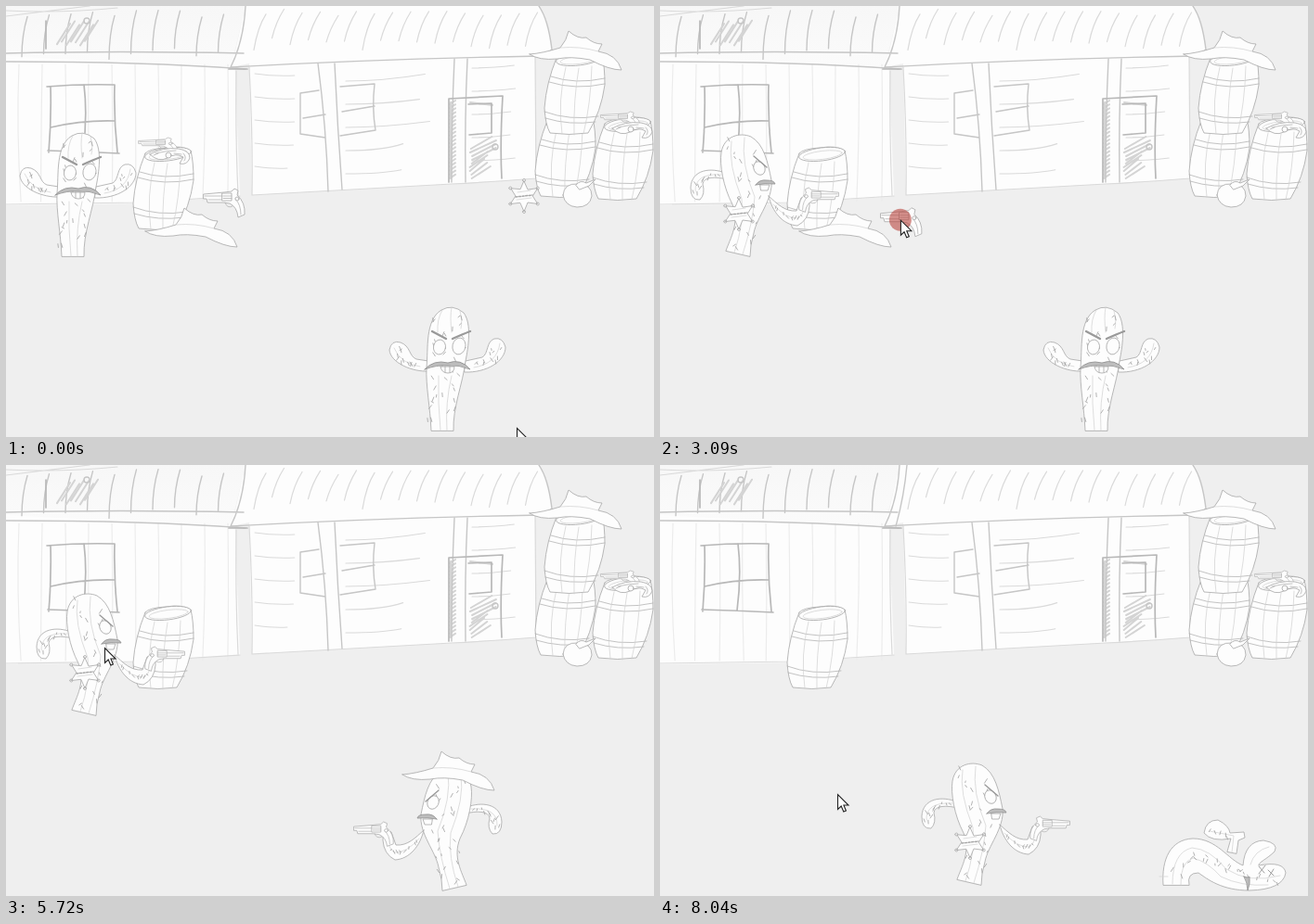
Recreate the animation shown at these times as an HTML page. Size 698x465 px, loop 8420 ms.

```html
<!DOCTYPE html>
<html lang="en">
<head>
<meta charset="utf-8">
<title>Cactus duel</title>
<style>
html, body { margin: 0; width: 100%; height: 100%; overflow: hidden; background: #efefef; }
svg { display: block; width: 698px; height: 465px; }
.item { fill: #fdfdfd; stroke: #a8a8a8; stroke-width: .8; stroke-linejoin: round; stroke-linecap: round; }
.item .thin { fill: none; stroke: #d0d0d0; stroke-width: .7; }
.item .hoop { fill: none; stroke: #b4b4b4; stroke-width: .8; }
.item .spines { fill: none; stroke: #a0a0a0; stroke-width: .8; }
.item .dark { fill: #bdbdbd; stroke: #909090; }
.item .brow { fill: none; stroke: #9a9a9a; stroke-width: 2.4; }
.item .slim { stroke-width: 1.4; }
.pencil { fill: none; stroke: #c6c6c6; stroke-width: 1.4; stroke-linecap: round; stroke-linejoin: round; }
.pencil .faint { stroke: #ececec; stroke-width: 1.2; }
.pencil .soft { stroke: #dadada; stroke-width: 1.2; }
.pencil .bold { stroke: #b8b8b8; stroke-width: 1.7; }
.pencil .shade { stroke: #d4d4d4; stroke-width: 2; }
</style>
</head>
<body>
<svg viewBox="0 0 698 465">
  <defs>
    <linearGradient id="roofShade" x2="0" y2="1">
      <stop stop-color="#f7f7f7"/><stop offset="1" stop-color="#fbfbfb"/>
    </linearGradient>

    <g id="barrel" class="item">
      <path d="M150 159Q139 186 137 213Q138 231 143 240Q164 243 184 240Q198 217 202 188Q202 168 199 156Q190 150 172 153Q154 154 150 159Z"/>
      <ellipse cx="174.500" cy="160" rx="25" ry="7" transform="rotate(-7 174 160)"/>
      <ellipse class="thin" cx="175" cy="161" rx="21" ry="4.500" transform="rotate(-7 174 160)"/>
      <path class="hoop" d="M144 179Q170 188 202 181M142 185Q170 194 202 187M137 217Q164 227 195 222M138 224Q164 232 192 228"/>
      <path class="thin" d="M160 169Q151 205 156 241M174 170Q168 205 169 242M188 168Q187 208 179 241"/>
    </g>

    <g id="hat" class="item">
      <path d="M150 243Q164 242 183 236Q190 228 192 218Q202 227 211 225Q219 232 228 232L224 240Q244 243 249 260Q236 260 215 249Q194 245 180 248Q160 250 150 243Z"/>
      <path class="thin" d="M183 236Q204 234 224 240"/>
    </g>

    <g id="gun" class="item">
      <path d="M0 6L22 4L30 3L33 0L37 2L36 7Q45 15 44 28L37 31Q36 20 28 16L21 15L4 15L3 11L0 11Z"/>
      <path d="M20 5h10v8h-10z"/>
      <path class="hoop" d="M1 8H20M5 12H19M21 8h9M21 10.500h9M23 15q2 7 8 4M34 11q6 6 6 17"/>
      <circle cx="36" cy="11" r="2"/>
    </g>

    <g id="pistols">
      <use href="#gun" transform="translate(0 1) scale(.95 .58)"/>
      <g class="item"><path d="M12 19Q26 11 43 13Q55 15 55 23Q52 31 44 29L48 22Q40 17 31 23Q21 28 12 19Z"/>
      <path class="hoop" d="M18 18Q30 15 40 15M48 18q4 4 1 8M16 20l5 -2M38 18l8 1"/><circle cx="32" cy="20" r="3"/></g>
    </g>

    <g id="star" class="item">
      <path id="badge"/>
      <path style="stroke-width:1.500" stroke-dasharray="2 1.600" d="M-9 1L9 -1"/>
      <path class="thin" d="M-8 4L8 2M-7 -4L7 -6"/>
    </g>

    <g id="front" class="item">
      <path d="M57 206C40 207 16 197 15 183Q17 172 27 175C38 179 36 190 44 193L57 195Z"/>
      <path d="M96 207C120 208 140 195 140 180Q137 169 128 171C119 174 122 187 115 191L97 195Z"/>
      <path d="M60 270C59 245 54 222 55 202C57 182 53 151 71 140Q83 133 95 143C104 155 100 180 97 195C94 220 83 245 84 270Z"/>
      <path class="thin" d="M72 140Q66 150 67 164M82 137Q80 148 82 164M91 141Q94 152 92 160M68 211Q67 240 70 270M82 211Q75 240 77 270M20 181Q27 198 48 201M134 176Q131 198 106 202"/>
      <path class="spines"/>
      <ellipse cx="69" cy="180" rx="6.500" ry="8" transform="rotate(10 69 180)"/>
      <ellipse cx="90" cy="179" rx="7" ry="9" transform="rotate(12 90 179)"/>
      <path class="brow" d="M61 163L76 171M83 171Q94 166 102 163"/>
      <path d="M70 201h15q0 7-7 7t-8-7M75 201v6M80 201v6"/>
      <path class="dark" d="M53 204Q63 193 78 197Q92 192 102 204Q90 199 78 200Q66 199 53 204Z"/>
    </g>

    <g id="side" class="item">
      <path d="M72 187C60 184 47 184 46 192Q49 203 43 209Q33 210 33 196C34 176 55 174 70 180Z"/>
      <path d="M71 264C76 250 86 234 78 214C68 195 64 171 66 158C69 140 86 136 98 141C112 149 116 168 120 188C122 209 104 228 101 245Q97 258 97 270Z"/>
      <path d="M117 205C126 213 134 222 147 221L152 207Q162 203 161 216Q160 231 148 237C132 236 121 222 117 205Z"/>
      <path class="thin" d="M77 146Q73 170 88 208Q91 234 80 266M91 142Q87 170 102 206Q100 234 89 268M38 200Q37 180 66 182M122 214Q136 230 149 229Q156 224 156 211"/>
      <path class="spines"/>
      <ellipse cx="107" cy="175" rx="6" ry="7.500" transform="rotate(-25 107 175)"/>
      <path class="brow slim" d="M101 162L115 174"/>
      <path d="M108 193h10l-2 6h-7z"/>
      <path class="dark" d="M103 193Q107 187 115 188Q123 188 124 192Q113 191 103 193Z"/>
    </g>
    <use id="heldGun" href="#gun" transform="translate(192 196) scale(-.96 .85)"/>
  </defs>

  <g>
    <path fill="#fdfdfd" d="M0 50H246L252 205L140 213L0 215Z"/>
    <path fill="url(#roofShade)" d="M0 0H258L242 67L0 54Z"/>
    <path fill="#fdfdfd" d="M258 0H575Q583 10 588 48L570 54V186L480 192L265 204L262 62L243 66Z"/>
    <g class="pencil">
      <path id="planks" class="faint"/>
      <path id="slats" class="soft"/>
      <path id="rafters"/>
      <path class="shade" id="scribble"/>
      <path class="soft" d="M0 5Q60 8 120 2M0 11L90 0M0 214L140 212L252 205M248 70Q247 140 250 204M570 55L571 186Q520 190 480 192L265 204Q266 140 262 66"/>
      <path d="M258 0Q256 38 242 66Q400 57 575 54Q584 51 588 47Q584 14 574 0M0 51Q120 48 256 51M0 60Q150 60 258 68"/>
      <path class="bold" d="M44 87Q80 84 117 85Q116 122 120 158M48 87Q49 122 46 158M45 156Q84 157 122 159M84 85Q88 118 83 157M48 131Q82 123 117 124M43 16V46M240 68H260"/>
      <path d="M336 62Q345 130 347 200M354 62Q357 130 362 198M483 57Q480 120 480 190M497 57Q494 120 495 190M317 94L337 91M344 142L317 138V94M320 121L344 117M360 87L397 84Q394 110 398 134L360 140M362 114L397 108"/>
      <path class="bold" d="M477 100L535 97Q532 150 534 186M498 106L523 105V137L499 139M477 100V190"/>
      <circle cx="87" cy="16" r="3"/><circle cx="527" cy="152" r="3"/>
    </g>
    <path id="crack" class="pencil" d="M266 0Q263 34 254 66"/>
  </g>

  <use href="#barrel" transform="translate(433 -35)"/>
  <use href="#barrel" transform="translate(443 -103)"/>
  <use href="#barrel" transform="translate(495 -32)"/>
  <use href="#hat" transform="translate(414 -191)"/>
  <use href="#pistols" transform="translate(641 113)"/>
  <g class="item"><path d="M600 204Q601 191 616 192Q631 192 631 205Q629 217 615 217Q602 216 600 204Z"/><path d="M614 193Q619 187 625 191L635 187L628 194L618 198Z"/></g>
  <use href="#barrel"/>

  <g id="right">
    <use id="rightFront" href="#front" transform="translate(398 188)"/>
    <use id="rightSide" href="#side" transform="translate(567 189) scale(-1 1)"/>
  </g>
  <g id="fallen" class="item">
    <path d="M611 417L615 403Q594 407 586 397Q588 383 601 383Q613 389 614 397L629 396L630 402L623 405L621 419Z"/>
    <path d="M542 453C540 425 550 404 574 403C600 403 612 426 628 432Q630 406 650 405Q667 408 662 417C654 425 644 429 645 432Q672 427 674 440Q671 458 635 459C605 459 590 447 580 440Q567 440 570 453Z"/>
    <path class="thin" d="M552 452Q552 418 573 413Q592 414 610 436Q635 452 668 443M561 453Q560 429 574 424Q590 428 604 444Q626 455 655 453M636 431Q640 416 656 412M592 395L618 400L616 418M538 444h9"/>
    <path class="spines"/>
    <path stroke="#888" d="M645 433l6 7M652 432l-7 9M655 437l6 6M661 436l-5 8"/>
    <path class="dark" d="M629 444q5 2 6 0q1 8-2 15q0-8-4-15z"/>
  </g>
  <use id="hatLoose" href="#hat"/>
  <g id="left">
    <use id="leftFront" href="#front"/>
    <g id="leftSide"><use href="#side"/><use href="#heldGun"/></g>
    <use id="starWorn" href="#star" transform="translate(85 224)"/>
  </g>
  <g id="rightGun"><use href="#heldGun" transform="translate(567 189) scale(-1 1)"/></g>
  <use id="gunLoose" href="#gun"/>
  <use id="pistolsLoose" href="#pistols"/>
  <use id="starLoose" href="#star"/>

  <g id="bang">
    <g class="item" id="puffs"></g>
    <g fill="none" stroke-linejoin="round">
      <path id="word" stroke="#b4b4b4" stroke-width="4.500" d="M399 323L401 343M399 323Q410 320 409 328Q408 332 402 332Q413 331 412 338Q410 344 402 343M415 343L422 323L430 341M418 336L428 335M435 342L437 322L447 343L450 323M464 328Q455 322 453 335Q455 347 464 340L463 336L458 337M479 327L471 341M466 346L466 349"/>
      <use href="#word" class="hollow"/>
      <path stroke="#f4f4f4" stroke-width="2" stroke-dasharray="3 1.200" d="M399 323L401 343M402 332Q413 331 412 338Q410 344 402 343M415 343L422 323L430 341M435 342L437 322L447 343L450 323M464 328Q455 322 453 335Q455 347 464 340M479 327L471 341"/>
    </g>
  </g>

  <circle id="press" r="12" fill="#b9423a" fill-opacity=".58"/>
  <path id="cursor" d="M.5 .5V16.500L4.200 13L6.800 19L9.400 18L6.900 12H12Z" fill="#fff" stroke="#222" stroke-width="1.100"/>
</svg>
<script>
const $ = id => document.getElementById(id);
const LOOP = 8420, STEP = 77.15;

let seed = 7;
const rand = () => (seed = seed * 16807 % 2147483647) / 2147483647;
const jitter = n => (rand() - .5) * n;
const repeat = (n, make) => Array.from({ length: n }, (_, i) => make(i)).join('');
const draw = (el, d) => el.setAttribute('d', d);

// Scenery hatching
draw($('planks'), repeat(10, i => `M${14 + i * 25} 63q${jitter(6)} 70 ${jitter(5)} 148`));
draw($('slats'), repeat(5, i => {
  const y = 73 + i * 25;
  return `M268 ${y}q20 3 ${36 + jitter(16)} 2M366 ${y + 8}q40 0 ${70 + jitter(50)} ${-6 + jitter(4)}` +
    `M502 ${y - 6}q20 0 ${45 + jitter(20)} -3`;
}) + repeat(16, i => `M${280 + i * 19.5} ${7 + jitter(8)}q-9 14 -13 ${34 + jitter(12)}`));
draw($('rafters'), repeat(10, i => `M${23 + i * 23.5} ${8 + jitter(8)}q-6 20 -6 ${44 + jitter(8)}`));
draw($('scribble'), repeat(20, i => `M478 ${106 + i * 4.2}l6 -4`) +
  repeat(9, i => `M${501 + jitter(3)} ${154 + i * 4}L${522 + jitter(14)} ${141 + i * 4}`) +
  repeat(7, i => `M${55 + i * 5} ${40 + jitter(6)}l14 -22`) + 'M500 104L524 107M479 104V186');

// Sheriff badge and gun smoke
const ring = (n, inner, outer, cx = 0, cy = 0) => repeat(n * 2, i => {
  const a = i * Math.PI / n - Math.PI / 2, r = (i % 2 ? inner : outer) + jitter(2);
  return `${i ? 'L' : 'M'}${(cx + r * Math.cos(a)).toFixed(1)} ${(cy + r * Math.sin(a)).toFixed(1)}`;
}) + 'Z';
draw($('badge'), ring(6, 9, 16) + repeat(6, i => {
  const a = i * Math.PI / 3 - Math.PI / 2;
  return `M${17 * Math.cos(a) - 1.5} ${17 * Math.sin(a)}a1.5 1.5 0 1 0 3 0a1.5 1.5 0 1 0 -3 0`;
}));
$('puffs').innerHTML = [[410, 359], [430, 353], [448, 358], [438, 374], [449, 394], [420, 374]]
  .map(([x, y]) => `<path stroke="#c2c2c2" d="${ring(6, 7, 12, x, y)}"/>`).join('');

// Cactus spines, scattered around body and arm middle lines
const ticks = (n, mid, width) => repeat(n, i => {
  const [x, y] = mid(i / n);
  return `M${(x + jitter(width)).toFixed(1)} ${(y + jitter(width / 4)).toFixed(1)}l${jitter(6).toFixed(1)} ${(3 + jitter(3)).toFixed(1)}`;
});
const arch = (cx, cy, rx, ry, from, to) => k => {
  const a = (from + (to - from) * k) * Math.PI / 180;
  return [cx + rx * Math.cos(a), cy + ry * Math.sin(a)];
};
const spines = (id, d) => draw(document.querySelector(`#${id} .spines`), d);
spines('front', ticks(34, k => [78 - 6 * k, 143 + 118 * k], 34) +
  ticks(11, arch(48, 179, 23, 19, 180, 90), 13) + ticks(11, arch(108, 179, 23, 19, 0, 90), 13));
spines('side', ticks(32, k => [k < .5 ? 88 + 24 * k : 113 - 26 * k, 146 + 114 * k], 34) +
  ticks(11, arch(60, 198, 21, 17, 170, 285), 12) + ticks(9, arch(144, 209, 18, 19, 160, 45), 11));
spines('fallen', ticks(26, k => [556 + 105 * k, k < .2 ? 440 - 120 * k : 412 + 38 * k], 16) +
  ticks(5, k => [592 + 28 * k, 392 + 10 * k], 8));

// Keyed values: rows of [time, ...values]
function track(keys, t) {
  let i = keys.findIndex(k => k[0] > t);
  if (i < 0) return keys[keys.length - 1].slice(1);
  if (i === 0) return keys[0].slice(1);
  const a = keys[i - 1], b = keys[i], k = (t - a[0]) / (b[0] - a[0]);
  return a.slice(1).map((v, j) => v + (b[j + 1] - v) * k);
}

const pointer = [
  [60, 550, 455], [430, 558, 207], [500, 558, 207], [850, 338, 206], [1300, 77, 226], [1370, 77, 226],
  [1690, 170, 167], [1770, 170, 167], [2210, 95, 194], [2380, 68, 206], [2550, 68, 206],
  [2900, 234, 210], [2970, 234, 210], [3390, 330, 290], [3690, 471, 388], [3800, 471, 388],
  [4260, 212, 239], [4330, 212, 239], [4800, 478, 356], [4880, 478, 356], [5100, 346, 336],
  [5660, 106, 197], [5860, 106, 197], [5880, 114, 198], [6310, 406, 368], [6500, 446, 374],
  [6580, 446, 374], [7260, 191, 355]
];
const drags = {
  star: [460, 1340], pistols: [1730, 2480], gun: [2930, 3760], hat: [4290, 4840], cactus: [5865, 6540]
};
const stretch = [[7180, 1], [7260, 1.33], [7320, 1.26], [7420, 1.24], [7580, .88], [7740, 1.06], [7900, .98], [8020, 1]];
const DUEL = 6690, FALL = 7460;

const show = (id, on) => $(id).style.display = on ? '' : 'none';
const move = (id, x, y, extra = '') => $(id).setAttribute('transform', `translate(${x} ${y}) ${extra}`);

// Offset of a dragged thing from where it was picked up
function dragged(name, t) {
  const [from, to] = drags[name];
  if (t < from) return [0, 0];
  const start = name === 'cactus' ? [114, 198] : track(pointer, from);
  const now = track(pointer, Math.min(t, to));
  return [now[0] - start[0], now[1] - start[1]];
}

function loose(name, t, x, y) {
  const [dx, dy] = dragged(name, t);
  move(name + 'Loose', x + dx, y + dy);
  show(name + 'Loose', t < drags[name][1]);
}

function render(time) {
  const t = time < 70 ? 0 : 70 + Math.floor((time - 70 + 12) / STEP) * STEP;
  const armedLeft = t >= drags.pistols[1], armedRight = t >= drags.gun[1];
  const duel = t >= DUEL, down = t >= FALL;

  loose('star', t, 558, 205);
  loose('pistols', t, 143, 141);
  loose('gun', t, 213, 197);

  show('leftFront', !armedLeft);
  show('leftSide', armedLeft);
  show('starWorn', t >= drags.star[1]);
  const [lx, ly] = duel ? [249, 183] : dragged('cactus', t);
  const [sy] = track(stretch, t), sx = sy < 1 ? 1 / sy : 1;
  move('left', lx, ly, `translate(84 270) scale(${sx} ${sy}) translate(-84 -270)`);

  show('rightFront', !armedRight);
  show('rightSide', armedRight && !down);
  show('rightGun', armedRight && !down);
  show('fallen', down);
  const [rx, ry] = duel ? [86, -5] : [0, 0];
  move('right', rx, ry);
  move('rightGun', rx, ry);

  const worn = t >= drags.hat[1];
  const [hx, hy] = worn ? [277 + rx, 91 + ry] : dragged('hat', t);
  move('hatLoose', hx, hy);
  show('hatLoose', !down);

  show('bang', t >= 7240 && t < 7980);
  $('bang').style.opacity = track([[7500, 1], [7960, 0]], t)[0];
  show('crack', t >= 7580);

  const [x, y] = track(pointer, t);
  move('cursor', x, y);
  move('press', x, y);
  show('press', Object.values(drags).some(([a, b]) => t >= a && t < b));
}

const begin = performance.now();
function tick() {
  render((performance.now() - begin) % LOOP);
  requestAnimationFrame(tick);
}
tick();
</script>
</body>
</html>
```
